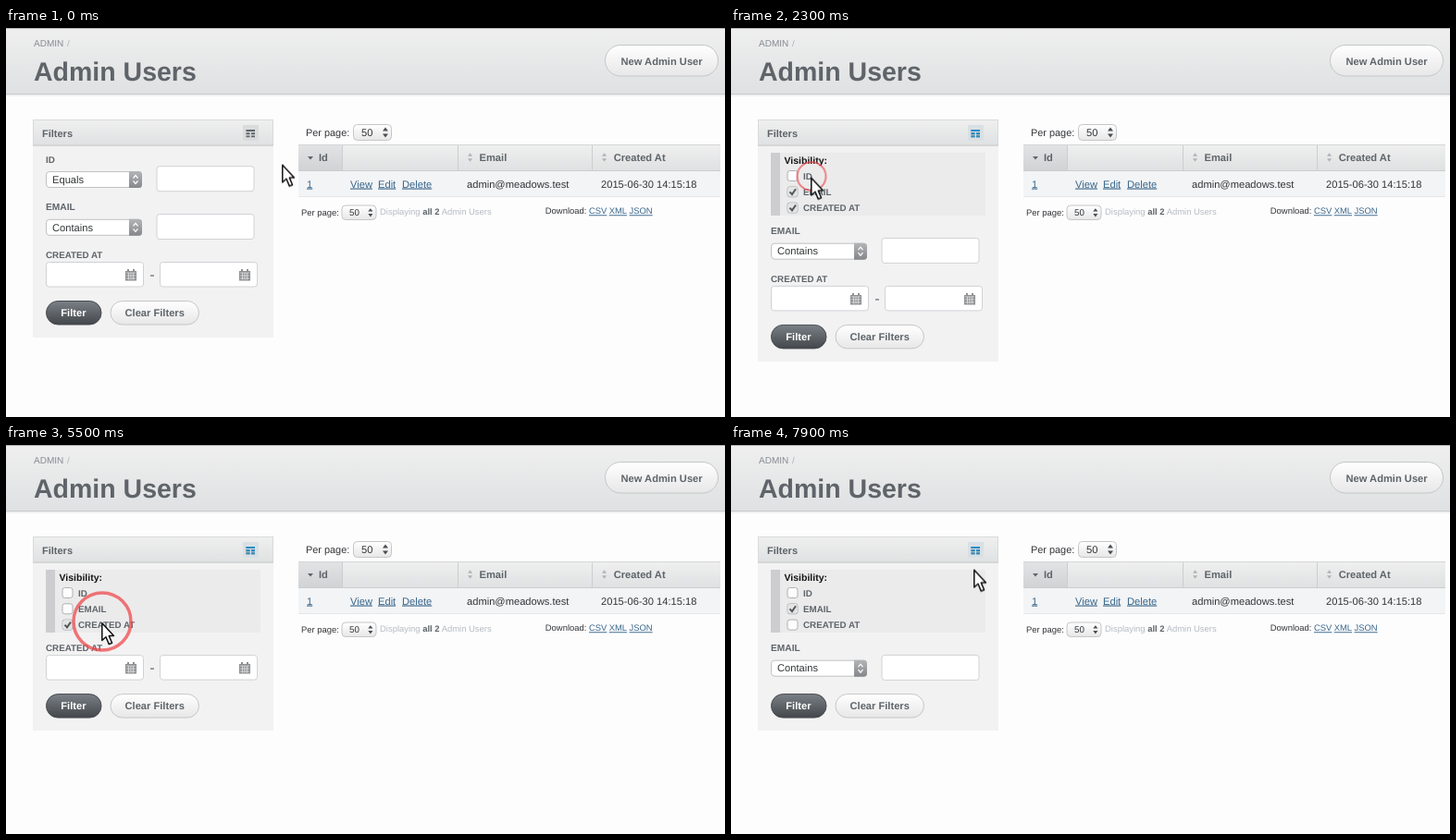
Write an HTML page that moves like this. It is 777 by 421 pixels and loops after 8 s.

```html
<!DOCTYPE html>
<html lang="en">
<head>
<meta charset="utf-8">
<title>Admin Users</title>
<style>
  html, body { margin: 0; width: 100%; height: 100%; overflow: hidden; background: #fefdfe; }
  svg { display: block; width: 100vw; height: 100vh; animation: state 8s step-end infinite; }

  text { font: 11.15px "Liberation Sans", Arial, sans-serif; fill: #323537; text-rendering: geometricPrecision; white-space: pre; }
  .b { font-weight: bold; fill: #5e6469; }
  .cap { font-weight: bold; font-size: 9.8px; fill: #5e6469; }
  .sm { font-size: 9.45px; }
  .dim { fill: #b4bbc1; }
  .link { fill: #38678b; text-decoration: underline; }
  .field { fill: #fff; stroke: #cfd2d5; }
  .pill { fill: url(#light); stroke: #c4c6c8; }
  .line { stroke: #cbcdcf; }
  .tick { fill: none; stroke: #55585b; stroke-width: 2; }

  /* Which parts are shown: 1 or 0. The layout follows from these. */
  @keyframes state {
    0% { --vis: 0; --id: 1; --em: 1; --cr: 1; --narrow: 0; --blue: 0; }
    7.5% { --vis: 1; --narrow: 1; }
    8.75% { --blue: 1; }
    28.75% { --id: 0; --narrow: 0; }
    50% { --em: 0; }
    70% { --cr: 0; }
    83.75% { --em: 1; }
  }
  svg {
    --vis: 0; --id: 1; --em: 1; --cr: 1; --narrow: 0; --blue: 0;
  }
  #panel, #email, #created, #foot { --row: 51.8px; --open: calc(var(--vis) * 77.7px); }
  #visibility { opacity: var(--vis); }
  #id { opacity: var(--id); transform: translateY(calc(var(--vis) * 77.7px)); }
  #email { opacity: var(--em); transform: translateY(calc(var(--open) + (var(--id) - 1) * var(--row))); }
  #created { opacity: var(--cr); transform: translateY(calc(var(--open) + (var(--id) + var(--em) - 2) * var(--row))); }
  #foot { transform: translateY(calc(var(--open) + (var(--id) + var(--em) + var(--cr) - 3) * var(--row))); }
  #panel { height: calc(208px + var(--open) + (var(--id) + var(--em) + var(--cr) - 3) * var(--row)); }
  #blue { opacity: var(--blue); }
  .shift { transform: translateX(calc(var(--narrow) * var(--d))); }
  .wide { width: calc(456px - var(--narrow) * 15px); }

  #cursor { animation: move 8s step-end infinite; }
  @keyframes move {
    0% { transform: translate(298px, 147.5px); }
    1.25% { transform: translate(298px, 147.5px); animation-timing-function: steps(2, start); }
    3.75% { transform: translate(267.5px, 115.5px); }
    15% { transform: translate(267.5px, 115.5px); animation-timing-function: steps(2, start); }
    17.5% { transform: translate(232px, 125px); animation-timing-function: steps(3, start); }
    21.25% { transform: translate(116px, 154px); animation-timing-function: steps(2, start); }
    23.75% { transform: translate(86px, 161.5px); }
    30% { transform: translate(86px, 161.5px); animation-timing-function: steps(5, start); }
    36.25% { transform: translate(96px, 175px); animation-timing-function: steps(2, start); }
    38.75% { transform: translate(97px, 179px); }
    53.75% { transform: translate(97px, 179px); animation-timing-function: steps(4, start); }
    58.75% { transform: translate(103px, 192px); }
    77.5% { transform: translate(103px, 192px); animation-timing-function: steps(3, start); }
    81.25% { transform: translate(94px, 174.5px); }
    92.5% { transform: translate(94px, 174.5px); animation-timing-function: steps(6, start); }
    100% { transform: translate(262px, 134.5px); }
  }

  #ring { fill: none; stroke: #ee4a4d; stroke-width: 3.5; animation: click 8s step-end infinite; }
  @keyframes click {
    0% { opacity: 0; transform: translate(269.5px, 114px); }
    6.25% { opacity: .75; transform: translate(269.5px, 114px); }
    7.5% { opacity: .75; transform: translate(269.5px, 114px) scale(.83); }
    8.75% { opacity: 0; }
    27.5% { opacity: .75; transform: translate(87px, 160.5px); }
    28.75% { opacity: .75; transform: translate(87px, 160.5px) scale(.5); }
    30% { opacity: 0; }
    48.75% { opacity: .75; transform: translate(98.5px, 178px) scale(.6); }
    50% { opacity: .75; transform: translate(98.5px, 178px); }
    51.25% { opacity: 0; }
    68.75% { opacity: .75; transform: translate(104px, 191px); }
    70% { opacity: .75; transform: translate(104px, 191px) scale(.5); }
    71.25% { opacity: 0; }
    82.5% { opacity: .75; transform: translate(94.5px, 173.5px); }
    83.75% { opacity: .75; transform: translate(94.5px, 173.5px) scale(.5); }
    85% { opacity: 0; }
  }
</style>
</head>
<body>
<svg viewBox="0 0 777 421" preserveAspectRatio="none">
  <defs>
    <linearGradient id="bar" x2="0" y2="1"><stop stop-color="#efefef"/><stop offset="1" stop-color="#dfe1e2"/></linearGradient>
    <linearGradient id="sorted" x2="0" y2="1"><stop stop-color="#e2e3e4"/><stop offset="1" stop-color="#d0d2d4"/></linearGradient>
    <linearGradient id="light" x2="0" y2="1"><stop stop-color="#fff"/><stop offset="1" stop-color="#e7e7e8"/></linearGradient>
    <linearGradient id="dark" x2="0" y2="1"><stop stop-color="#7a8086"/><stop offset="1" stop-color="#43474b"/></linearGradient>
    <linearGradient id="knob" x2="0" y2="1"><stop stop-color="#b4b5b7"/><stop offset="1" stop-color="#85878a"/></linearGradient>

    <path id="arrows" d="M0 -1.5L3 -5.5L6 -1.5ZM0 1.5L3 5.5L6 1.5Z"/>
    <g id="select">
      <rect x=".5" y=".5" width="103" height="17" rx="3.5" fill="#fff" stroke="#bfc1c3"/>
      <path d="M90 0H100.5Q104 0 104 3.5V14.5Q104 18 100.5 18H90Z" fill="url(#knob)"/>
      <path d="M94.5 7.5L97 4.5L99.5 7.5M94.5 10.5L97 13.5L99.5 10.5" fill="none" stroke="#fff" stroke-width="1.2"/>
    </g>
    <g id="date">
      <rect class="field" x=".5" y=".5" width="105" height="26.5" rx="3"/>
      <path d="M86 10H98V20.5H86ZM88 8H90V10H88ZM94 8H96V10H94Z" fill="#8e9092"/>
      <path d="M87 12H97M87 15H97M87 18H97M89.5 12V19.5M92 12V19.5M94.5 12V19.5" stroke="#e4e4e4" stroke-width=".8"/>
    </g>
    <rect id="box" x="61" y="-5.5" width="11" height="11" rx="2.5" fill="#fdfdfd" stroke="#aeb0b2"/>
    <g id="check">
      <rect x="61.5" y="-5" width="10" height="10" rx="2" fill="#e3e4e5"/>
      <path class="tick" d="M63.5 0L66 2.8L70 -3"/>
    </g>
  </defs>

  <rect width="777" height="421" fill="#fefdfe"/>

  <!-- Page header -->
  <rect y="72" width="777" height="2" fill="#f1f1f1"/>
  <rect width="777" height="71.5" fill="url(#bar)"/>
  <path d="M0 .5H777" stroke="#b3b4b5"/>
  <path d="M0 71.5H777" stroke="#c6c8c9"/>
  <text x="30" y="19.8" style="font-size:10px;fill:#858c93">ADMIN <tspan x="66" fill="#b0b4b8">/</tspan></text>
  <text class="b" x="30" y="57" style="font-size:28.5px">Admin Users</text>
  <g class="shift" style="--d:-14px">
    <rect class="pill" x="647.5" y="18.5" width="122" height="33.5" rx="16.7"/>
    <text class="b" x="664.5" y="39.8">New Admin User</text>
  </g>

  <!-- Filter panel -->
  <rect id="panel" x="29" y="127" width="260" fill="#f3f2f3"/>
  <rect x="29.5" y="99.5" width="259" height="27.5" fill="url(#bar)" stroke="#d8dadb"/>
  <path d="M29 127H289" stroke="#c9cbcc"/>
  <text class="b" x="39" y="117.7" style="font-size:11px">Filters</text>
  <rect x="256" y="105" width="17" height="17" rx="1" fill="#d9dbdc"/>
  <path id="icon" d="M259.5 110H269V112H259.5ZM259.5 113.3H263.5V115.2H259.5ZM265 113.3H269V115.2H265ZM259.5 116.4H263.5V118.3H259.5ZM265 116.4H269V118.3H265Z" fill="#5e6469"/>
  <g id="blue">
    <rect x="256" y="105" width="17" height="17" rx="1" fill="#d8e0e5"/>
    <use href="#icon"/>
    <path d="M259.5 110H269V112H259.5ZM259.5 113.3H263.5V115.2H259.5ZM265 113.3H269V115.2H265ZM259.5 116.4H263.5V118.3H259.5ZM265 116.4H269V118.3H265Z" fill="#2b8cc4"/>
  </g>

  <g id="id">
    <text class="cap" x="43" y="145.6">ID</text>
    <use href="#select" x="43" y="155"/>
    <text x="50" y="167.8">Equals</text>
    <rect class="field" x="163" y="149.7" width="105" height="27" rx="3"/>
  </g>
  <g id="email">
    <text class="cap" x="43" y="197.4" style="font-size:10.2px">EMAIL</text>
    <use href="#select" x="43" y="206.8"/>
    <text x="50" y="219.6">Contains</text>
    <rect class="field" x="163" y="201.5" width="105" height="27" rx="3"/>
  </g>
  <g id="created">
    <text class="cap" x="43" y="249">CREATED AT</text>
    <use href="#date" x="43" y="253"/>
    <use href="#date" x="166" y="253"/>
    <path d="M156 268H160" stroke="#5e6469" stroke-width="1.2"/>
  </g>
  <g id="foot">
    <rect x="43.5" y="295.5" width="59.5" height="25.5" rx="12.7" fill="url(#dark)" stroke="#484c50"/>
    <text class="b" x="59.3" y="312.3" style="fill:#fff">Filter</text>
    <rect class="pill" x="113" y="295.5" width="95.5" height="25.5" rx="12.7"/>
    <text class="b" x="128.5" y="312.3">Clear Filters</text>
  </g>

  <g id="visibility">
    <rect x="43" y="135" width="232" height="68" fill="#ecebec"/>
    <rect x="43" y="135" width="10" height="68" fill="#cdcdcf"/>
    <text x="57.5" y="147.3" style="font-size:10.5px;font-weight:bold;fill:#141414">Visibility:</text>
    <use href="#box" y="160"/>
    <use href="#box" y="177.3"/>
    <use href="#box" y="194.6"/>
    <use href="#check" y="160" style="opacity:var(--id)"/>
    <use href="#check" y="177.3" style="opacity:var(--em)"/>
    <use href="#check" y="194.6" style="opacity:var(--cr)"/>
    <text class="cap" x="78" y="163.6">ID</text>
    <text class="cap" x="78" y="180.9">EMAIL</text>
    <text class="cap" x="78" y="198.2">CREATED AT</text>
  </g>

  <!-- Table -->
  <text x="324" y="116.8" style="font-size:10.9px">Per page:</text>
  <rect class="pill" x="375.5" y="104.5" width="41" height="17" rx="4"/>
  <text x="384" y="117">50</text>
  <use href="#arrows" x="407" y="113" fill="#4a4d50"/>

  <rect class="wide" x="316" y="126.5" height="28" fill="url(#bar)"/>
  <rect x="316" y="126.5" width="47" height="28" fill="url(#sorted)"/>
  <rect class="wide" x="316" y="155" height="28" fill="#f3f4f6"/>
  <rect class="wide" x="316" y="126" height="1" fill="#d3d5d6"/>
  <rect class="wide" x="316" y="154" height="1" fill="#cbcdcf"/>
  <rect class="wide" x="316" y="182" height="1" fill="#e6e7e9"/>
  <path class="line" d="M363.5 127V154"/>
  <path d="M326 139H332L329 142.5Z" fill="#5e6469"/>
  <text class="b" x="338" y="144.3">Id</text>
  <text class="link" x="325" y="172.5">1</text>
  <g class="shift" style="--d:-2px">
    <text class="link" x="372" y="172.5">View</text>
    <text class="link" x="402" y="172.5">Edit</text>
    <text class="link" x="428" y="172.5">Delete</text>
  </g>
  <g class="shift" style="--d:-6px">
    <path class="line" d="M488.5 127V154"/>
    <use href="#arrows" transform="translate(499 140) scale(.85)" fill="#b0b3b6"/>
    <text class="b" x="511.5" y="144.3">Email</text>
    <text x="498" y="172.5">admin@meadows.test</text>
  </g>
  <g class="shift" style="--d:-10px">
    <path class="line" d="M633.5 127V154"/>
    <use href="#arrows" transform="translate(644 140) scale(.85)" fill="#b0b3b6"/>
    <text class="b" x="656.7" y="144.3">Created At</text>
    <text x="643" y="172.5">2015-06-30 14:15:18</text>
  </g>

  <text class="sm" x="319" y="202.7">Per page:</text>
  <rect class="pill" x="363" y="192" width="37" height="15.5" rx="4"/>
  <text x="371" y="203.2" style="font-size:9.8px">50</text>
  <use href="#arrows" transform="translate(391.3 199.8) scale(.85)" fill="#4a4d50"/>
  <text class="sm dim" x="404" y="202">Displaying <tspan font-weight="bold" fill="#5e6469">all 2</tspan> Admin Users</text>
  <text class="sm" x="582.8" y="201.3">Download:</text>
  <text class="sm link" x="630" y="201.3">CSV</text>
  <text class="sm link" x="651.7" y="201.3">XML</text>
  <text class="sm link" x="673.5" y="201.3">JSON</text>

  <circle id="ring" r="31"/>
  <path id="cursor" d="M.8 .8V19.5L5 15.8L8.3 23.6L11.6 22.2L8.3 14.6H13.5Z" fill="#fff" stroke="#111" stroke-width="1.5" stroke-linejoin="round"/>
</svg>
</body>
</html>
```
